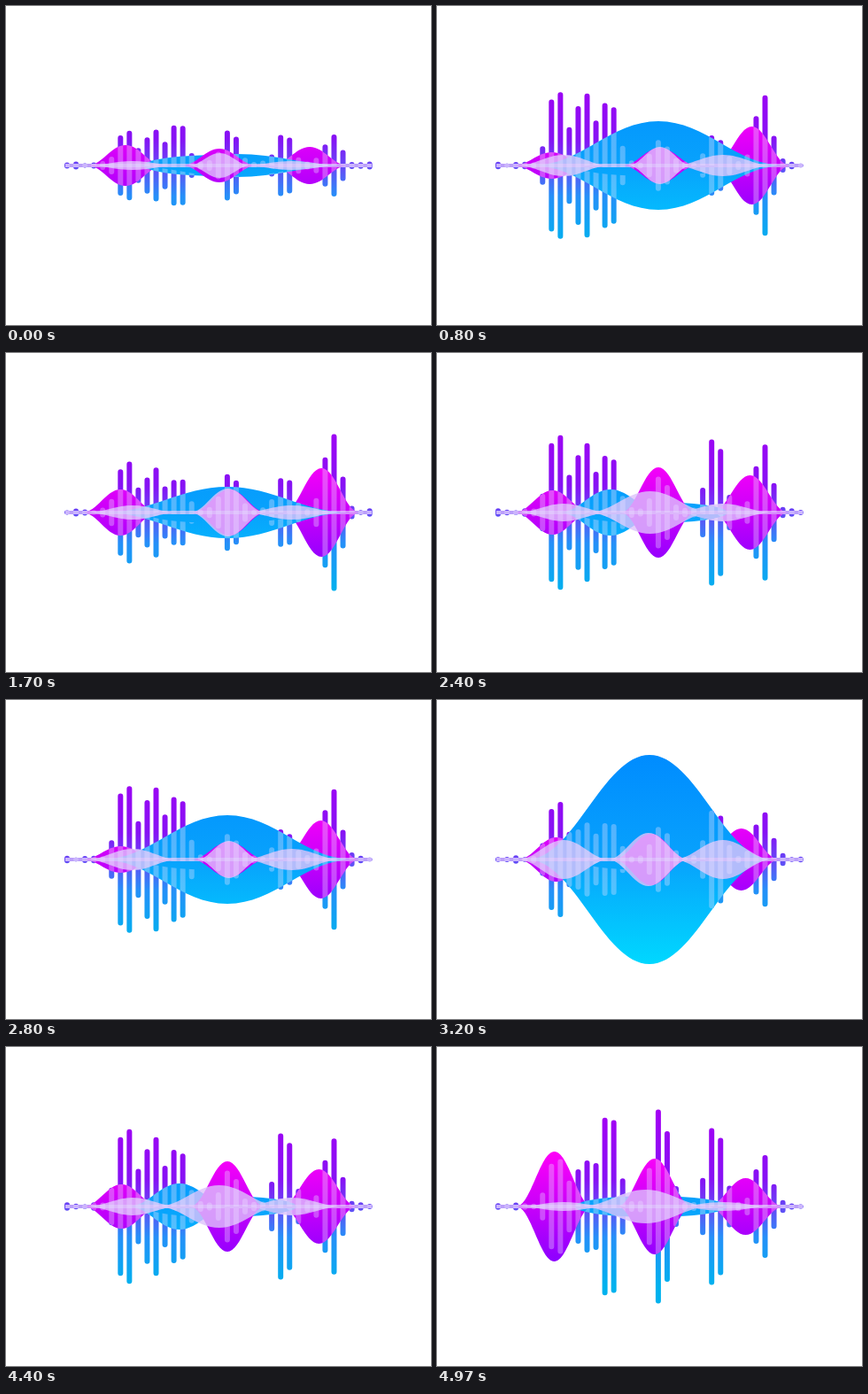
An HTML page with a canvas that plays this animation: 480 by 360 pixels, repeating every 5070 ms.

```html
<!DOCTYPE html>
<html lang="en">
<head>
<meta charset="utf-8">
<title>Sound wave</title>
<style>
  html, body { margin: 0; width: 100%; height: 100%; overflow: hidden; background: #fff; }
  canvas { display: block; }
</style>
</head>
<body>
<canvas id="stage" width="480" height="360"></canvas>
<script>
const ctx = document.getElementById('stage').getContext('2d');
const MID = 180, LOOP = 5070, CYCLE = 25;

// Steps of the cycle that carry a key value; curves ease between them.
const KEYS = [0, 5, 10, 12, 15, 21];
const curve = (...values) => step => {
  const i = KEYS.findLastIndex(k => k <= step), j = (i + 1) % KEYS.length;
  const p = (step - KEYS[i]) / ((KEYS[j] || CYCLE) - KEYS[i]);
  return values[i] + (values[j] - values[i]) * (1 - Math.cos(Math.PI * p)) / 2;
};

// Loud spots along the row of bars; each one lifts its neighbours too.
const PEAKS = [
  { bar: 6.6, level: curve(38, 92, 88, 56, 68, 58) },
  { bar: 9.7, level: curve(37, 78, 82, 50, 40, 48) },
  { bar: 12.5, level: curve(47, 66, 74, 111, 43, 38) },
  { bar: 18.3, level: curve(38, 38, 26, 112, 36, 43) },
  { bar: 24.4, level: curve(34, 86, 33, 94, 58, 40) },
  { bar: 29.8, level: curve(32, 74, 77, 56, 52, 88) }
];

// Waves: half heights, plus the sideways sway they share.
const sway = curve(-1, 0.5, 0.8, -0.2, -0.9, 0.9);
const leftPink = curve(23, 25, 15, 62, 25, 26);
const midPink = curve(19, 51, 20, 54, 29, 26);
const rightPink = curve(21, 42, 44, 32, 35, 50);
const midPale = curve(14, 24, 21, 19, 30, 27);
const sidePale = curve(5, 10, 12, 5, 22, 8);
const blueHeight = curve(13, 26, 50, 45, 118, 29);
const blueReach = curve(125, 58, 142, 40, 138, 138);
const blueCentre = curve(260, 196, 250, 249, 240, 250);

function gradient(...stops) {
  const top = stops[0][0], span = stops.at(-1)[0] - top;
  const g = ctx.createLinearGradient(0, top, 0, top + span);
  for (const [y, colour] of stops) g.addColorStop((y - top) / span, colour);
  return g;
}
const BAR_FILL = gradient([75, '#a400f4'], [150, '#8612f4'], [185, '#6050f6'], [215, '#2590f8'], [270, '#00b2ee']);
const PINK_FILL = gradient([118, '#ff00f8'], [180, '#c800fa'], [242, '#8c00ff']);
const BLUE_FILL = gradient([62, '#008cff'], [180, '#08a2fc'], [298, '#00d8ff']);

// A raised-cosine bell mirrored in the middle line.
function bell(path, centre, reach, height) {
  const near = reach * 0.38, far = reach - near;
  path.moveTo(centre - reach, MID);
  for (const side of [-1, 1]) {
    const h = side * height;
    path.bezierCurveTo(centre + side * far, MID, centre + side * near, MID + h, centre, MID + h);
    path.bezierCurveTo(centre - side * near, MID + h, centre - side * far, MID, centre - side * reach, MID);
    path.moveTo(centre + reach, MID);
  }
}

function bellPath(...bells) {
  const path = new Path2D();
  for (const [centre, reach, height] of bells) {
    for (const h of [-height, height]) {
      const near = reach * 0.38, far = reach - near;
      path.moveTo(centre - reach, MID);
      path.bezierCurveTo(centre - far, MID, centre - near, MID + h, centre, MID + h);
      path.bezierCurveTo(centre + near, MID + h, centre + far, MID, centre + reach, MID);
    }
  }
  return path;
}

function barPath(step) {
  const path = new Path2D();
  for (let i = 0; i < 35; i++) {
    let h = 3.5 + 1.2 * Math.sin(i * 2.1 + 2 * Math.PI * step / CYCLE);
    for (const { bar, level } of PEAKS) h += level(step) * Math.exp(-((i - bar) ** 2) / 1.6);
    path.roundRect(66 + 10.05 * i, MID - h, 6, 2 * h, 3);
  }
  return path;
}

function draw(step) {
  const fill = (path, style) => { ctx.fillStyle = style; ctx.fill(path, 'nonzero'); };
  const drift = sway(step), pinkHeight = midPink(step), centre = 247 + 6 * drift;
  const bars = barPath(step);
  const sides = bellPath([132 - 3 * drift, 43, leftPink(step)], [350 + 7 * drift, 43, rightPink(step)]);
  const middle = bellPath([centre, 42, pinkHeight]);
  const blue = bellPath([blueCentre(step), blueReach(step), blueHeight(step)]);
  const band = new Path2D();
  band.ellipse(242, MID, 86, 12, 0, 0, 2 * Math.PI);
  // The middle pale wave spreads and drifts left as the pink one grows.
  const pale = bellPath(
    [143, 52, sidePale(step)],
    [centre - 0.3 * (pinkHeight - 20), 14 + 1.1 * pinkHeight, midPale(step)],
    [323, 56, sidePale(step)]
  );
  const axis = new Path2D();
  axis.rect(67, MID - 2, 346, 4);

  ctx.fillStyle = '#fff';
  ctx.fillRect(0, 0, 480, 360);
  fill(bars, BAR_FILL);
  fill(axis, BAR_FILL);
  fill(sides, PINK_FILL);
  fill(band, BLUE_FILL);
  fill(blue, BLUE_FILL);
  fill(middle, PINK_FILL);
  fill(axis, 'rgba(222, 196, 252, .7)');
  fill(pale, 'rgba(222, 194, 252, .8)');

  // Bars shine through the waves as light stripes.
  for (const wave of [sides, band, blue, middle, pale]) axis.addPath(wave);
  ctx.save();
  ctx.clip(axis);
  fill(bars, 'rgba(235, 225, 255, .34)');
  ctx.restore();
}

// The wave advances 12.5 steps a second, shown on a 30 Hz grid.
function tick() {
  const slot = Math.floor((performance.now() % LOOP + 4) * 0.03);
  draw(Math.floor(slot / 2.4 + 1e-6) % CYCLE);
  requestAnimationFrame(tick);
}
tick();
</script>
</body>
</html>
```
